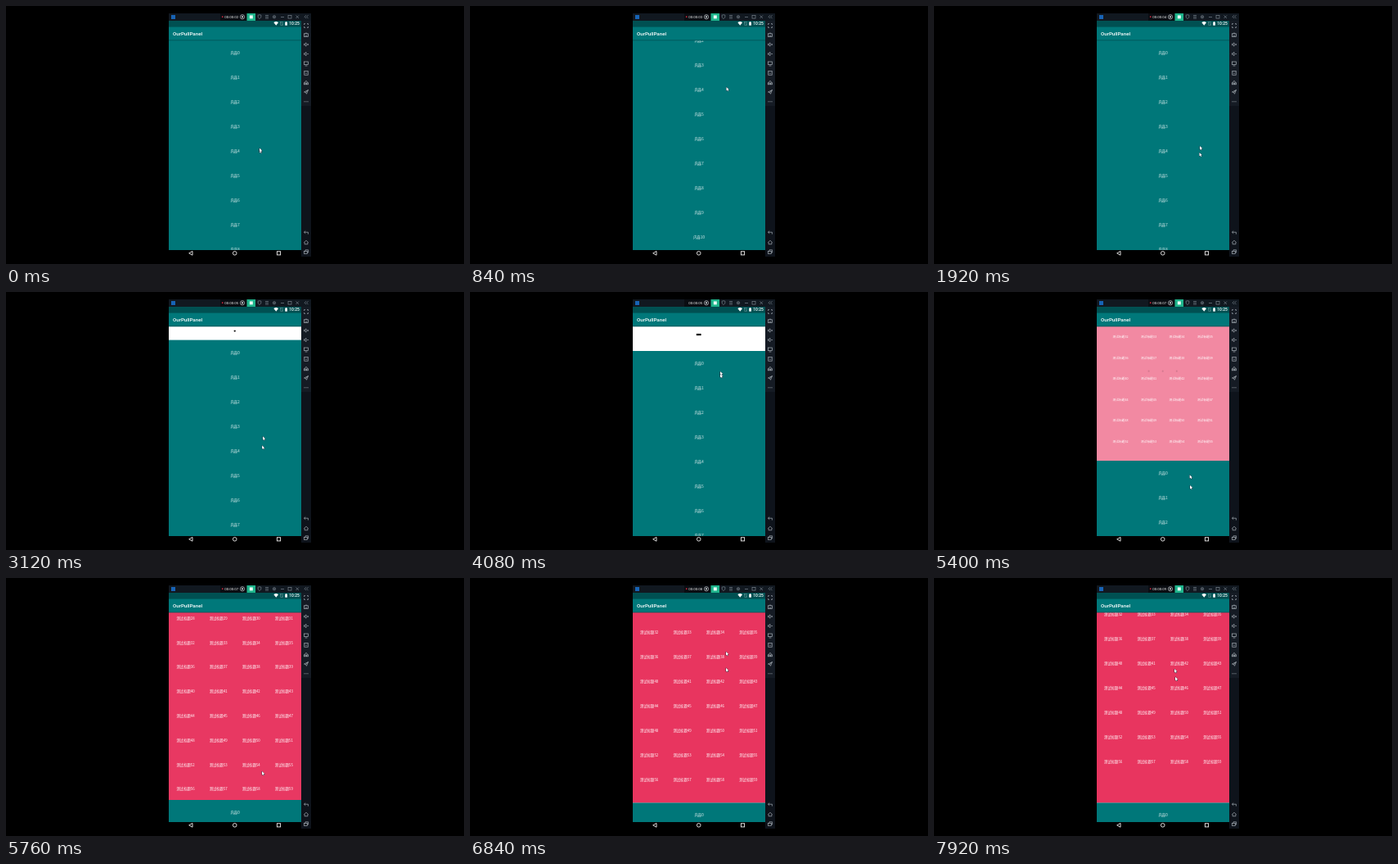
Recreate the animation shown at these times as an HTML page with a canvas. Size 560 by 315 pixels, loop 8 s.

```html
<!DOCTYPE html>
<html lang="zh">
<head>
<meta charset="utf-8">
<title>Pull-down panel</title>
<style>
html, body { margin: 0; width: 100%; height: 100%; overflow: hidden; background: #000; }
canvas { display: block; width: 560px; height: 315px; }
</style>
</head>
<body>
<canvas id="stage"></canvas>
<script>
const canvas = document.getElementById('stage');
const ctx = canvas.getContext('2d');
const dpr = window.devicePixelRatio || 1;
canvas.width = 560 * dpr;
canvas.height = 315 * dpr;

const LOOP = 8000, STEP = 120;
const TOP = 42, BOTTOM = 298, OPEN = 232.5, ROW = 30;
const CJK = '"Noto Sans CJK SC", "Noto Sans CJK", sans-serif';
const UI = 'Roboto, Arial, sans-serif';

// Tracks: [time, value, ...]
const pullTrack = [[0, 0], [1320, 0], [1440, 22], [1560, 12], [1680, 0], [3000, 0], [3200, 28],
  [3400, 0], [3720, 0], [4080, 30], [5040, 88.5], [5400, 164], [5640, 222], [5760, 229], [5880, OPEN]];
const listTrack = [[0, 0], [720, 75], [960, 75], [1320, 0], [1920, 0], [2400, 75], [2640, 75], [3000, 0]];
const gridTrack = [[0, 0], [6120, 0], [6480, -90], [6840, 14.3], [7200, -75], [7440, -75], [7920, 35.8]];
const mouseTrack = [[-120, 310, 177], [0, 310, 174.5], [720, 313, 100], [960, 314, 100], [1440, 320, 197],
  [1680, 323, 204], [1920, 325, 172], [2400, 322, 97], [2640, 320, 100], [3200, 312, 203], [3480, 308, 150],
  [3720, 306, 71], [3960, 306, 95], [4080, 306, 101], [5040, 311, 161], [5400, 313, 237], [5760, 313, 237],
  [6120, 313, 120], [6480, 313, 210], [6840, 313, 91], [7200, 306, 180], [7440, 302, 190], [7920, 294, 112]];
const secondStarts = [-600, 720, 1800, 3120, 4440, 5400, 6600, 7680, 8800];

function at(track, t) {
  if (t <= track[0][0]) return track[0].slice(1);
  for (let i = 1; i < track.length; i++) {
    const a = track[i - 1], b = track[i];
    if (t <= b[0]) {
      const k = (t - a[0]) / (b[0] - a[0]);
      return a.slice(1).map((v, j) => v + (b[j + 1] - v) * k);
    }
  }
  return track[track.length - 1].slice(1);
}

function rect(x, y, w, h, color) {
  ctx.fillStyle = color;
  ctx.fillRect(x, y, w, h);
}

function text(s, x, y, size, family, align = 'center', weight = 400, color = '#fff') {
  ctx.font = `${weight} ${size}px ${family}`;
  ctx.textAlign = align;
  ctx.textBaseline = 'middle';
  ctx.fillStyle = color;
  ctx.fillText(s, x, y);
}

function line(...points) {
  ctx.beginPath();
  points.forEach(([x, y], i) => i ? ctx.lineTo(x, y) : ctx.moveTo(x, y));
  ctx.stroke();
}

function poly(color, ...points) {
  ctx.beginPath();
  points.forEach(([x, y]) => ctx.lineTo(x, y));
  ctx.closePath();
  ctx.fillStyle = color;
  ctx.fill();
}

function disc(x, y, r, color) {
  ctx.beginPath();
  ctx.arc(x, y, r, 0, 7);
  ctx.fillStyle = color;
  ctx.fill();
}

function ring(x, y, r) {
  ctx.beginPath();
  ctx.arc(x, y, r, 0, 7);
  ctx.stroke();
}

function pen(color, width) {
  ctx.strokeStyle = color;
  ctx.lineWidth = width;
}

function drawTitleBar(t) {
  rect(199, 9, 174, 9, '#111820');
  rect(202, 11, 5, 5, '#1763b5');
  rect(262, 9, 33, 9, '#0a0d12');
  const i = secondStarts.findIndex(s => s > t) - 1;
  const middle = (secondStarts[i] + secondStarts[i + 1]) / 2;
  if (t < middle) disc(264.7, 13.2, 0.9, '#c8283c');
  text('00:00:0' + (i + 2), 267.3, 13.5, 4.4, UI, 'left', 400, '#e8e8e8');
  pen('#d5d9dc', 0.7);
  ring(289, 13.3, 2.6);
  disc(289, 13.3, 1.1, '#d5d9dc');
  rect(294.5, 9, 10.5, 9, '#1fb58c');
  rect(297.8, 11.4, 4, 4, '#e9fff8');

  pen('#78828b', 0.7);
  line([308, 11.3], [310, 10.7], [312, 11.3], [311.7, 14], [310, 15.7], [308.3, 14], [308, 11.3]);
  for (const y of [11.5, 13.3, 15.1]) line([317, y], [321, y]);
  ring(328, 13.3, 1.7);
  disc(328, 13.3, 0.8, '#78828b');
  line([336, 13.5], [340, 13.5]);
  ctx.strokeRect(345, 11.5, 4, 3.6);
  line([354.5, 11.5], [358, 15]);
  line([358, 11.5], [354.5, 15]);
  for (const x of [365, 367.5]) line([x + 2, 11.2], [x, 13.2], [x + 2, 15.2]);
}

function drawSideBar() {
  rect(361, 18, 12, 104, '#151b24');
  rect(361, 122, 12, 184, '#0e131b');
  pen('#a9b1b8', 0.7);
  const x = 367;
  for (const sx of [-1, 1]) for (const sy of [-1, 1])
    line([x + sx, 24 + sy * 2.4], [x + sx * 2.4, 24 + sy * 2.4], [x + sx * 2.4, 24 + sy]);
  ctx.strokeRect(x - 2.5, 33.8, 5, 3.8);
  line([x - 1.3, 36.3], [x + 1.3, 36.3]);
  line([x - 1, 33.8], [x, 32.7], [x + 1, 33.8]);
  for (const y of [47, 58.5]) {
    line([x - 2.5, y - 0.8], [x - 1.4, y - 0.8], [x, y - 2.2], [x, y + 2.2],
      [x - 1.4, y + 0.8], [x - 2.5, y + 0.8], [x - 2.5, y - 0.8]);
    line([x + 1.2, y], [x + 3, y]);
  }
  line([x + 2.1, 46.1], [x + 2.1, 47.9]);
  ctx.strokeRect(x - 2.5, 68, 5, 3.5);
  line([x - 1.4, 73], [x + 1.4, 73]);
  ctx.strokeRect(x - 2.2, 79.6, 4.4, 4.6);
  line([x - 1, 81.5], [x, 82.6], [x + 1, 81.5]);
  line([x - 2.4, 94], [x, 91.2], [x + 2.4, 94]);
  ctx.strokeRect(x - 2.4, 94, 1.8, 1.8);
  ctx.strokeRect(x + 0.6, 94, 1.8, 1.8);
  line([x - 2.5, 105], [x + 2.5, 102.5], [x + 0.5, 107.3], [x - 0.5, 105.6], [x - 2.5, 105]);
  line([x - 0.5, 105.6], [x + 2.5, 102.5]);
  for (const d of [-2, 0, 2]) disc(x + d, 116.7, 0.55, '#a9b1b8');

  line([x - 0.8, 274.6], [x - 2.5, 276.2], [x - 0.8, 277.8]);
  line([x - 2.5, 276.2], [x + 2.4, 276.2], [x + 2.4, 278.6]);
  line([x - 2.6, 288.8], [x, 286.2], [x + 2.6, 288.8]);
  line([x - 1.9, 288.4], [x - 1.9, 290.8], [x + 1.9, 290.8], [x + 1.9, 288.4]);
  ctx.strokeRect(x - 2.5, 299.3, 3.8, 3);
  line([x - 1, 299.3], [x - 1, 297.8], [x + 2.6, 297.8], [x + 2.6, 301], [x + 1.3, 301]);
}

function drawAppBar() {
  rect(199, 18, 162, 7.5, '#005052');
  rect(199, 25.3, 162, 16.7, '#00787a');
  rect(199, 41.4, 162, 0.9, '#00565a');
  text('OurPullPanel', 204, 34.1, 6.2, UI, 'left', 500);
  poly('#fff', [327.4, 20.2], [328.7, 19.3], [330.2, 19], [331.7, 19.3], [333, 20.2], [330.2, 23.8]);
  pen('#5e9293', 0.6);
  ctx.strokeRect(335.7, 19.5, 2.5, 3.8);
  line([335.2, 19.2], [338.7, 23.6]);
  rect(341.2, 19.7, 2.7, 4, '#fff');
  rect(341.9, 19, 1.3, 0.8, '#fff');
  text('10:25', 346.3, 21.7, 4.9, UI, 'left', 500);
}

function drawNavBar() {
  rect(199, BOTTOM, 162, 8, '#000');
  pen('#f0f0f0', 0.9);
  line([228, 299.4], [223.7, 301.8], [228, 304.2], [228, 299.4]);
  ring(279.7, 301.8, 2.3);
  ctx.strokeRect(331.4, 299.7, 4.2, 4.2);
}

function drawList(pull, scroll) {
  for (let i = 0; i < 16; i++) {
    const y = 57.3 + i * ROW + pull - scroll;
    if (y > TOP - 5 && y < BOTTOM + 5) text('内容' + i, 280, y, 4.4, CJK, 'center', 400, '#e4f2f2');
  }
}

function drawPanel(pull, scroll) {
  if (pull <= 0) return;
  const p = pull / OPEN;
  const tint = Math.max(0, (p - 0.3) / 0.7);
  ctx.save();
  ctx.beginPath();
  ctx.rect(199, TOP, 162, pull);
  ctx.clip();
  rect(199, TOP, 162, pull, '#fff');
  ctx.globalAlpha = tint;
  rect(199, TOP, 162, pull, '#e8355f');
  ctx.globalAlpha = 1;

  if (tint > 0) {
    ctx.save();
    ctx.translate(279.7, 158 - (1 - p) * 126);
    ctx.scale(0.5 + p / 2, 0.5 + p / 2);
    for (let n = 0; n < 60; n++) {
      const y = 102.3 - (14 - Math.floor(n / 4)) * ROW - scroll;
      text('测试标题' + n, (n % 4 - 1.5) * 40.4, y, 4.35, CJK);
    }
    ctx.restore();
  }

  // Loading dots part as the panel grows
  const spread = Math.max(0, (pull - 14) * 0.114);
  const radius = Math.min(1.3, pull / 20) - Math.min(0.25, spread / 30);
  ctx.globalAlpha = Math.max(0, 1 - tint * 1.5);
  for (const side of [-1, 0, 1]) disc(279.7 + side * spread, TOP + pull / 3, radius, '#111');
  ctx.restore();
}

function drawMouse(x, y) {
  ctx.save();
  ctx.translate(x, y - 1);
  ctx.beginPath();
  [[0, 0], [0, 4.4], [1.1, 3.5], [1.8, 5], [2.5, 4.7], [1.9, 3.2], [3.2, 3.1]]
    .forEach(([px, py]) => ctx.lineTo(px, py));
  ctx.closePath();
  pen('#123', 0.7);
  ctx.stroke();
  ctx.fillStyle = '#fff';
  ctx.fill();
  ctx.restore();
}

function draw(t) {
  const [pull] = at(pullTrack, t), [scroll] = at(listTrack, t), [gridScroll] = at(gridTrack, t);
  ctx.setTransform(dpr, 0, 0, dpr, 0, 0);
  rect(0, 0, 560, 315, '#000');
  drawTitleBar(t);
  drawSideBar();

  ctx.save();
  ctx.beginPath();
  ctx.rect(199, TOP, 162, BOTTOM - TOP);
  ctx.clip();
  rect(199, TOP, 162, BOTTOM - TOP, '#007779');
  drawList(pull, scroll);
  drawPanel(pull, gridScroll);
  ctx.restore();

  drawAppBar();
  drawNavBar();

  const now = at(mouseTrack, t), before = at(mouseTrack, t - 60);
  if (Math.abs(now[1] - before[1]) > 1) drawMouse(...before);
  drawMouse(...now);
}

const start = performance.now();
function tick() {
  const t = (performance.now() - start) % LOOP;
  draw(Math.floor(t / STEP) * STEP);
  requestAnimationFrame(tick);
}
tick();
</script>
</body>
</html>
```
